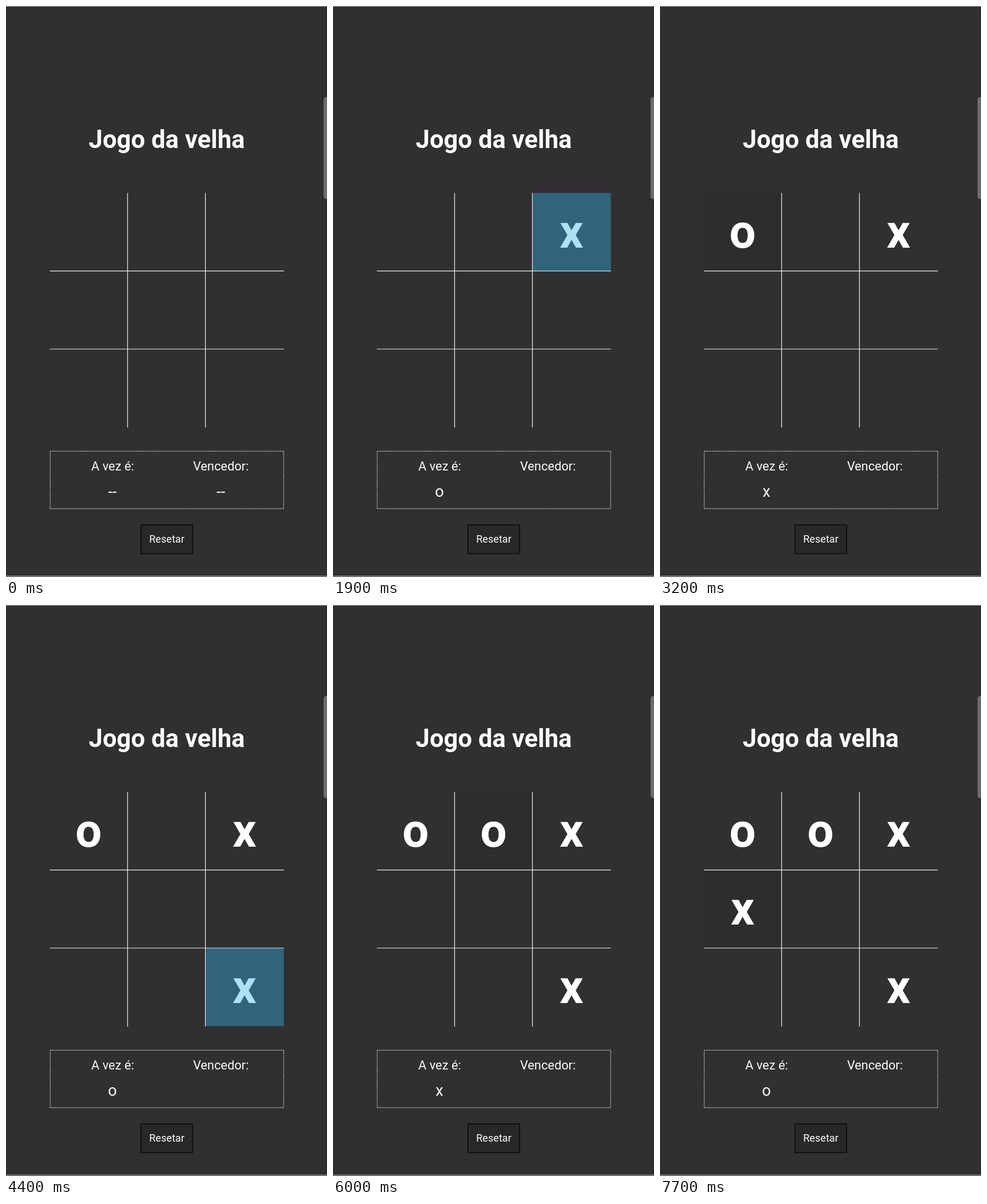
An HTML page for the animation above (8 s loop, 561 px wide and 997 px high).

```html
<!DOCTYPE html>
<html lang="pt-BR">
<head>
<meta charset="utf-8">
<title>Jogo da velha</title>
<style>
  html, body { margin: 0; width: 100%; height: 100%; overflow: hidden; background: #312f32; }
  svg { display: block; width: 561px; height: 997px; }
  text { font-family: Roboto, sans-serif; fill: #fcfafc; text-anchor: middle; }
  .title { font-size: 43.6px; font-weight: 700; }
  .label { font-size: 21.8px; }
  .value { font-size: 27.2px; }
  .button { font-size: 18.15px; }
  .mark { font-size: 81.7px; font-weight: 700; fill: #fff; }
</style>
</head>
<body>
<svg viewBox="0 0 561 997">
  <rect width="561" height="997" fill="#312f32"/>
  <path d="M0 .5H561" stroke="#a5a4a6"/>
  <path d="M0 995.5H561" stroke="#c2c1c3"/>
  <path d="M560.5 1V995" stroke="#242225"/>
  <path d="M561 159h-2q-4 1-4 5v168q0 4 4 5h2z" fill="#6d6c6e"/>
  <text class="title" x="281" y="248">Jogo da velha</text>

  <g id="shades"></g>
  <path d="M212.5 326.5V736M348.5 326.5V736M76.7 462.6H485.6M76.7 599H485.6" stroke="#f2f1f2" stroke-width="1.2"/>
  <g id="marks"></g>
  <g id="taps"></g>

  <rect x="77.3" y="777.3" width="408" height="100.4" fill="none" stroke="#f2f1f2" stroke-width="1.2" stroke-dasharray="1.36"/>
  <text class="label" x="186.4" y="811.4">A vez é:</text>
  <text class="label" x="375.6" y="811.4">Vencedor:</text>
  <text class="value" id="turn" x="186" y="857"></text>
  <text class="value" id="winner" x="375.6" y="857"></text>

  <rect x="235.8" y="906" width="90.4" height="50.4" rx="1" fill="#29272a" stroke="#060506" stroke-width="1.4"/>
  <text class="button" x="281" y="937.2">Resetar</text>
</svg>
<script>
const LOOP = 8000, START = 900, CELL = 136.3, LEFT = 76.7, TOP = 326.4;
const get = id => document.getElementById(id);

// Tap time, cell, how long the highlight holds, when its faint shade is gone
const moves = [
  { at: 1900, cell: 2, hold: 100, clear: 2200 },
  { at: 2900, cell: 0, hold: 200, clear: 4400 },
  { at: 4400, cell: 8, hold: 400, clear: 4800 },
  { at: 5400, cell: 1, hold: 500, clear: 7200 },
  { at: 7400, cell: 3, hold: 200, clear: LOOP }
];

function add(parent, tag, attrs) {
  const node = document.createElementNS("http://www.w3.org/2000/svg", tag);
  for (const name in attrs) node.setAttribute(name, attrs[name]);
  return get(parent).appendChild(node);
}

moves.forEach((move, i) => {
  const x = LEFT + move.cell % 3 * CELL;
  const y = TOP + Math.floor(move.cell / 3) * CELL;
  const box = { x, y, width: CELL, height: CELL };
  move.shade = add("shades", "rect", { ...box, fill: "#2c2d2d" });
  move.mark = add("marks", "text", { class: "mark", x: x + 67.6, y: y + 95.7 });
  move.mark.textContent = "xo"[i % 2];
  move.tap = add("taps", "rect", { ...box, fill: "#33b5e5" });
});

function draw(t) {
  let played = 0;
  for (const { at, hold, clear, shade, mark, tap } of moves) {
    const age = t - at, released = at + hold;
    if (age >= 0) played++;
    mark.setAttribute("opacity", age >= 0 ? 1 : 0);
    shade.setAttribute("opacity", t >= released && t < clear ? 1 : 0);
    const fading = t >= released && t < Math.min(released + 100, clear);
    tap.setAttribute("opacity", age >= 0 && t < released ? 0.4 : fading ? 0.1 : 0);
  }
  get("turn").textContent = t < START ? "--" : "xo"[played % 2];
  get("winner").textContent = t < START ? "--" : "";
}

const begin = performance.now();
function tick() {
  draw((performance.now() - begin) % LOOP);
  requestAnimationFrame(tick);
}
tick();
</script>
</body>
</html>
```
